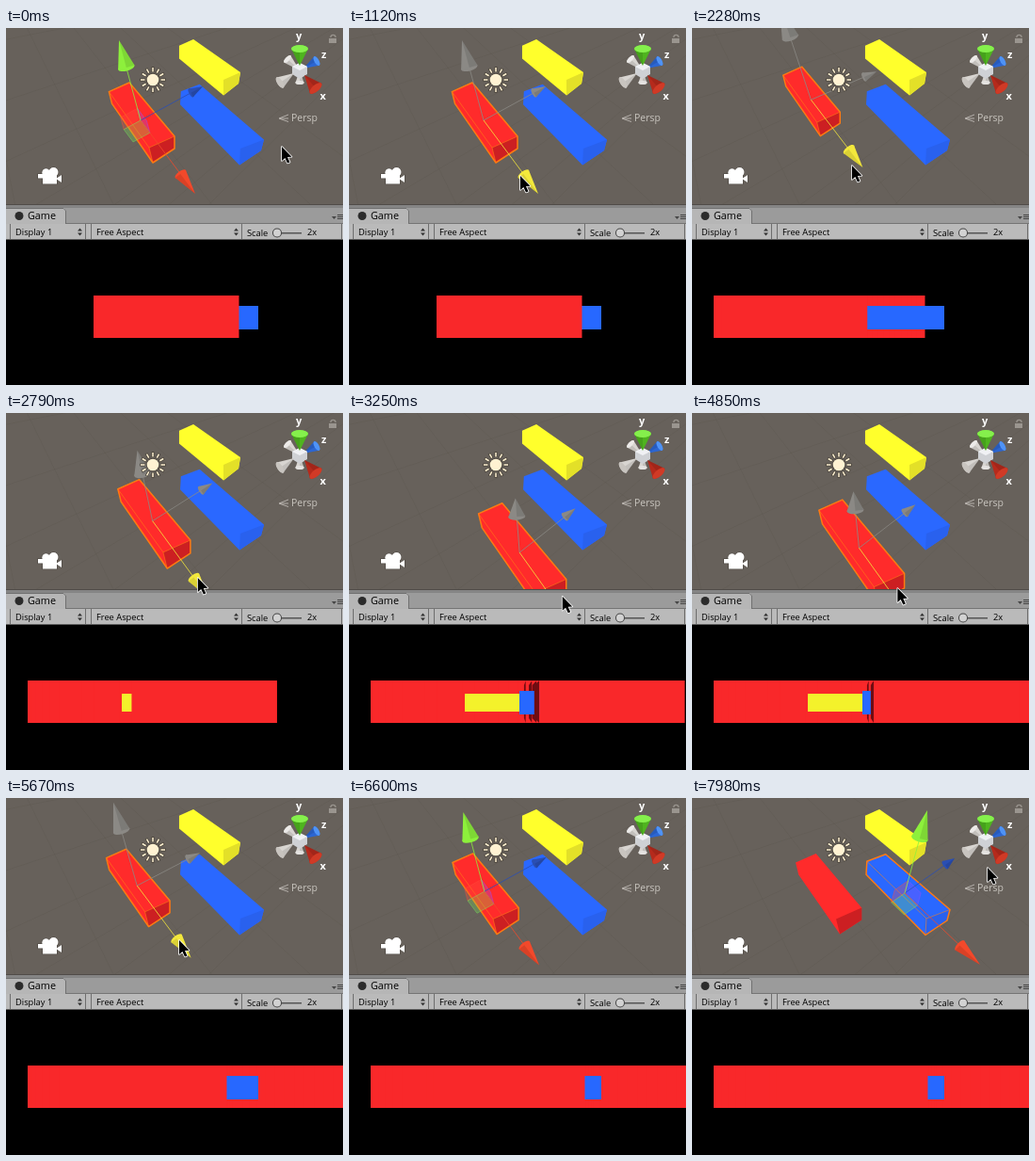
Recreate the animation shown at these times as an HTML page with a canvas. Size 358 by 379 pixels, loop 8000 ms.

```html
<!DOCTYPE html>
<html lang="en">
<head>
<meta charset="utf-8">
<title>Scene and game view</title>
<style>
html, body { margin: 0; width: 100%; height: 100%; overflow: hidden; background: #000; }
canvas { display: block; width: 100vw; height: 100vh; }
</style>
</head>
<body>
<canvas id="stage" width="358" height="379"></canvas>
<script>
const c = document.getElementById('stage').getContext('2d');
const LOOP = 8000, TICK = 57.5, HOVER = 440, PRESS = 1120, RELEASE = 6420, RESELECT = 7620;

// Eased moves: start, end, then block offset and cursor x, y to arrive at.
const home = [0, 293, 126];
const moves = [
  [30, 440, 0, 182, 157],
  [1120, 2100, -70, 167, 143.5],
  [2100, 3300, 110, 227, 195],
  [3730, 4320, 145, 232, 200],
  [4320, 5660, -13, 184, 151],
  [5660, 5940, 12, 192, 159],
  [5940, 6160, 3, 189, 156],
  [6380, 6590, 3, 368, 110],
  [7780, 7960, 3, 314, 74]
];
const snap = t => Math.max(0, PRESS + TICK * Math.floor((t - PRESS) / TICK + 1e-6));
const ease = u => (1 - Math.cos(Math.PI * Math.min(1, Math.max(0, u)))) / 2;
const pose = t => moves.reduce((at, [from, to, ...goal]) => {
  const u = ease((t - from) / (to - from));
  return at.map((v, i) => v + (goal[i] - v) * u);
}, home);

// Perspective: every x-parallel line meets at VP; w is relative depth.
const VP = [-61, -170];
const scaleFrom = (p, k) => [VP[0] + (p[0] - VP[0]) * k, VP[1] + (p[1] - VP[1]) * k];
const slide = (p, w, d) => scaleFrom(p, w / (w - 0.0013 * d));
const add = (p, v, k = 1) => [p[0] + v[0] * k, p[1] + v[1] * k];

function path(pts, close) {
  c.beginPath();
  pts.forEach(p => c.lineTo(p[0], p[1]));
  if (close) c.closePath();
}
function poly(pts, fill) { path(pts, true); c.fillStyle = fill; c.fill(); }
function line(pts, color, width = 1, close = false) {
  path(pts, close);
  c.strokeStyle = color; c.lineWidth = width; c.lineJoin = 'round'; c.stroke();
}
function rect(x, y, w, h, fill) { c.fillStyle = fill; c.fillRect(x, y, w, h); }
function disc(x, y, rx, fill, ry = rx, rot = 0) {
  c.beginPath(); c.ellipse(x, y, rx, ry, rot, 0, 7);
  c.fillStyle = fill; c.fill();
}
function text(s, x, y, size, fill, weight = 400) {
  c.font = `${weight} ${size}px "Open Sans", "Noto Sans", sans-serif`;
  c.fillStyle = fill; c.fillText(s, x, y);
}

// front: corners of the near end, clockwise from top left
const red = { front: [[152, 127], [179, 115], [179, 128], [156, 143]], ratio: 1.25,
  face: '#ff2b2b', end: '#cc1f22' };
const blue = { front: [[249, 128], [274, 118.5], [271, 130], [248, 145.5]], ratio: 1.256,
  face: '#2a68ff', end: '#2961ee' };
const yellow = { front: [[231, 55], [249, 47], [247, 59], [231, 71.5]], ratio: 1.192,
  face: '#ffff2c', end: '#e3e028' };

function block({ front, ratio, face, end }, d, selected) {
  const f = front.map(p => slide(p, 1 / ratio, d));
  const b = front.map(p => slide(scaleFrom(p, 1 / ratio), 1, d));
  const outline = [b[0], b[1], f[1], f[2], f[3], b[3]];
  poly(outline, face);
  poly(f, end);
  if (!selected) return;
  const thin = 'rgba(255,130,20,.7)';
  line([b[0], f[0], f[1]], thin, 0.8);
  line([f[0], f[3]], thin, 0.8);
  line(outline, '#ff7a12', 1.5, true);
}

function cone(tip, base, half, color, cap = color) {
  const [dx, dy] = add(tip, base, -1), len = Math.hypot(dx, dy);
  const n = [-dy / len * half, dx / len * half], tilt = Math.atan2(n[1], n[0]);
  disc(...base, half, color, half * 0.4, tilt);
  poly([tip, add(base, n), add(base, n, -1)], color);
  poly([tip, base, add(base, n)], 'rgba(0,0,0,.1)');
  if (cap !== color) disc(...base, half, cap, half * 0.45, tilt);
}

function handles(p, x, y, z, hot, drag) {
  const tint = color => drag ? '#8b8985' : color;
  if (!drag) {
    const a = add([0, 0], x, 0.17), b = add([0, 0], z, -0.27), u = add([0, 0], y, 0.15);
    for (const [s, t, rgb] of [[b, u, '255,80,60'], [a, u, '150,80,255'], [a, b, '120,235,90']]) {
      const quad = [p, add(p, s), add(add(p, s), t), add(p, t)];
      poly(quad, `rgba(${rgb},.28)`);
      line(quad, `rgba(${rgb},.6)`, 0.7, true);
    }
  }
  const arrow = (v, k, half, color) => {
    const base = add(p, v, k);
    line([p, base], color, 0.8);
    cone(add(p, v), base, half, color);
  };
  arrow(z, 0.81, 5, tint('#2a4fb4'));
  arrow(y, 0.66, 9, tint('#8df03c'));
  arrow(x, 0.73, 7, hot ? '#f3e83c' : '#f2492b');
}

function sun(x, y) {
  for (const [color, grow] of [['#4b453d', 0.8], ['#fff2d2', 0]]) {
    for (let i = 0; i < 12; i++) {
      const v = [Math.cos(i * Math.PI / 6), Math.sin(i * Math.PI / 6)];
      line([add([x, y], v, 8.5 - grow), add([x, y], v, 13 + grow)], color, 1.5 + 2 * grow);
    }
    disc(x, y, 6.3 + grow, color);
  }
}

function cameraIcon() {
  for (const [color, g] of [['#4d4842', 0.6], ['#fff', 0]]) {
    disc(42.5, 153.5, 4.2 + g, color);
    disc(50.5, 153, 5 + g, color);
    rect(39 - g, 155 - g, 15 + 2 * g, 10.5 + 2 * g, color);
    poly([[53, 160], [59 + g, 156 - g], [59 + g, 164 + g]], color);
    rect(34 - g, 155 - g, 5 + 2 * g, 4.5 + 2 * g, color);
  }
}

function compass() {
  const hub = [312, 45], pale = '#d8d5d1';
  cone(hub, [299, 33], 5, pale, '#eceae8');
  cone(hub, [312, 58], 4.5, pale, '#e4e2e0');
  cone([316, 43], [330, 35], 5.5, '#2c66d2', '#4f93f6');
  poly([[304, 41], [312, 37], [320, 41], [320, 49], [312, 54], [304, 49]], '#cfd1d5');
  poly([[304, 41], [312, 37], [320, 41], [312, 45]], '#f0f1f4');
  cone([312, 40], [312, 22], 9, '#4fb41f', '#85f04c');
  cone([306, 48], [291, 58], 6.5, pale, '#c8c4bf');
  cone([317, 50], [329, 64], 8, '#b52a1c', '#d03a26');
  text('y', 308, 12, 11, '#fff', 700);
  text('z', 335, 32, 11, '#fff', 700);
  text('x', 333.5, 76, 11, '#fff', 700);
  const soft = '#c9c5bf';
  line([[300, 92], [290, 96], [300, 99.5]], soft, 0.8);
  line([[291, 96], [300, 96]], soft, 0.8);
  text('Persp', 303, 99, 10.5, soft);
  rect(343, 11, 8, 5, '#9a958f');
  c.beginPath(); c.arc(347.5, 10, 2.6, Math.PI, 0);
  c.strokeStyle = '#9a958f'; c.lineWidth = 1.2; c.stroke();
}

function scene(t, d) {
  c.save();
  c.beginPath(); c.rect(0, 0, 358, 187); c.clip();
  rect(0, 0, 358, 187, '#67615b');
  for (let i = 0; i < 7; i++) {
    line([VP, [-220 + i * 120, 240]], 'rgba(40,36,32,.07)', 0.8);
    line([[490, -84], [-40, 20 + i * 70]], 'rgba(40,36,32,.07)', 0.8);
  }
  const onBlue = t >= RESELECT, hot = t >= HOVER && t < RELEASE;
  block(blue, 0, onBlue);
  block(yellow, 0, false);
  block(red, d, !onBlue);
  if (onBlue) handles([226, 101], [80, 76], [24, -88], [53, -37], false, false);
  else handles(slide([143, 98], 0.9, d), [58 + 0.05 * d, 78 + 0.1 * d],
    [-23 + 0.17 * d, -85 + 0.25 * d], [66 - 0.06 * d, -36 - 0.1 * d], hot, hot && t >= PRESS);
  sun(156, 55);
  cameraIcon();
  compass();
  c.restore();
}

function panel() {
  rect(0, 187, 358, 38, '#9b9b9b');
  rect(0, 187, 358, 1, '#504c48');
  rect(0, 188, 358, 3, '#858585');
  poly([[0, 191], [61, 191], [64, 194], [64, 209], [0, 209]], '#b6b6b6');
  line([[0, 191.5], [61, 191.5], [63.5, 194], [63.5, 208]], '#707070');
  rect(0, 208, 358, 16, '#bababa');
  rect(64, 207, 294, 1, '#747474');
  rect(0, 224, 358, 1, '#5c5c5c');
  disc(14, 199.5, 4.5, '#2b2b2b');
  poly([[346, 200], [351, 200], [348.5, 203]], '#444');
  for (const y of [198, 200, 202]) rect(352, y, 6, 1, '#444');
  for (const x of [4, 84, 90, 250, 356]) rect(x, 208, 1, 16, '#6e6e6e');
  text('Game', 23, 203, 10.8, '#000');
  text('Display 1', 10, 220, 9.3, '#000');
  text('Free Aspect', 96, 220, 9.3, '#000');
  text('Scale', 256, 220.5, 9.3, '#000');
  text('2x', 320, 220, 9.3, '#000');
  for (const x of [78.5, 244.5]) for (const s of [-1, 1])
    poly([[x - 2.5, 216.5 + s], [x + 2.5, 216.5 + s], [x, 216.5 + 4 * s]], '#333');
  rect(286, 217, 28, 1.5, '#555');
  disc(288, 217.5, 5, '#444');
  disc(288, 217.5, 4, '#d2d2d2');
}

// The game view is never cleared, so earlier positions stay behind.
function game(now) {
  const eye = 180;
  rect(0, 225, 358, 154, '#000');
  for (let s = PRESS; ; s += TICK) {
    const left = 93 + pose(Math.min(s, now))[0];
    rect(123, 298, 60, 19, '#f3f22b');
    rect(181, 295, 87, 25, '#2768ff');
    if (left > eye) {
      const back = eye + (left - eye) * 0.76;
      poly([[left, 284], [left, 329], [back, 324], [back, 289]], '#6f0d12');
    }
    rect(left, 284, 154.5, 45, '#f9282a');
    if (s >= now) break;
  }
}

function cursor(x, y) {
  const arrow = [[0, 0], [0, 15], [3.4, 12], [6, 17.5], [8.5, 16.4], [6, 11], [10.5, 10.7]]
    .map(v => add([x, y], v));
  line(arrow, '#fff', 1.6, true);
  poly(arrow, '#000');
}

function draw(ms) {
  const t = ms % LOOP, now = snap(t);
  const [d, x, y] = pose(now);
  scene(t, d);
  panel();
  game(now);
  cursor(x, y);
}

let start;
function frame(ms) {
  start ??= ms;
  draw(ms - start);
  requestAnimationFrame(frame);
}
draw(0);
requestAnimationFrame(frame);
</script>
</body>
</html>
```
